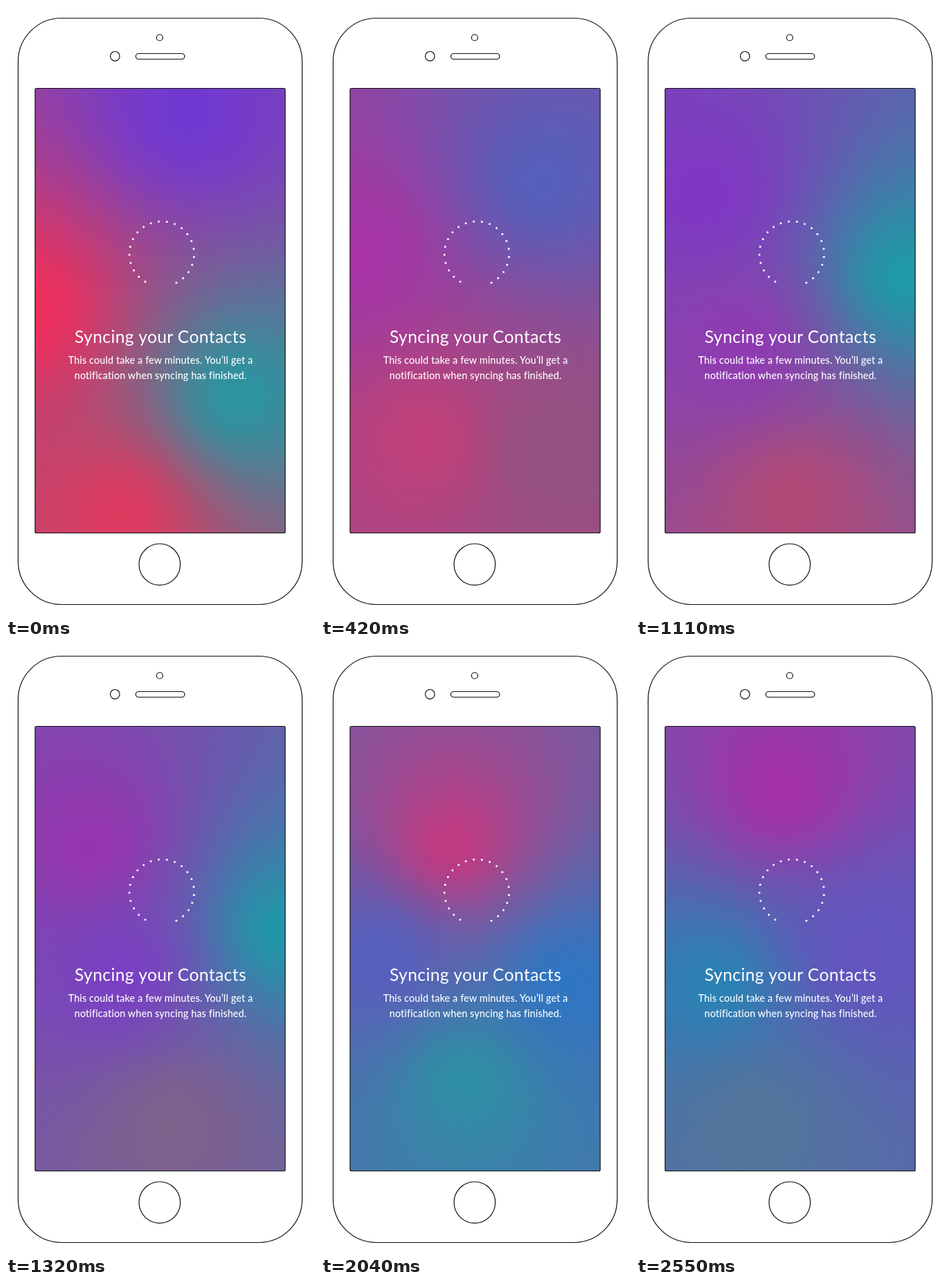
An HTML page with a canvas that plays this animation: 446x878 px, repeating every 2.58 s.

```html
<!DOCTYPE html>
<html lang="en">
<head>
<meta charset="utf-8">
<title>Syncing contacts</title>
<style>
  html, body { margin: 0; width: 100%; height: 100%; overflow: hidden; background: #fff; }
  canvas, svg { position: absolute; left: 0; top: 0; }
  canvas { left: 42px; top: 119px; width: 361px; height: 640px; }
  text { fill: #fff; text-anchor: middle; font-family: Lato, "Open Sans", sans-serif; }
  .title { font-size: 24.6px; letter-spacing: .4px; }
  .note { font-size: 14.3px; font-weight: 500; letter-spacing: .15px; }
</style>
</head>
<body>
<canvas width="91" height="160"></canvas>
<svg width="446" height="878" viewBox="0 0 446 878">
  <g fill="none" stroke="#111" stroke-width="1.2">
    <rect x="17.5" y="17.5" width="410" height="844" rx="62.5"/>
    <circle cx="221.8" cy="45.5" r="4.5"/>
    <circle cx="157.3" cy="72.3" r="6.8"/>
    <rect x="187.3" y="68.5" width="70.5" height="8" rx="4"/>
    <rect x="42" y="118.5" width="361" height="640" rx="2"/>
    <circle cx="221.8" cy="803.8" r="29.8"/>
  </g>
  <g id="dots" fill="#fff"></g>
  <text class="title" x="223" y="485">Syncing your Contacts</text>
  <text class="note" x="223" y="515">This could take a few minutes. You’ll get a</text>
  <text class="note" x="223" y="537">notification when syncing has finished.</text>
</svg>
<script>
const LOOP = 2580, STEP = 30;
const canvas = document.querySelector('canvas');
const ctx = canvas.getContext('2d');
const { width: W, height: H } = canvas;
const image = ctx.createImageData(W, H);

// Four wandering colour sources: "x y colour" at each key time.
const times = [0, 420, 840, 1320, 1590, 2040, 2550];
const sources = [
  '262 150 7139d2, 320 250 5660bb, 370 350 2496a6, 400 410 2296a8, 400 445 2296a8, 355 490 2f76c2, 330 440 6354c0',
  '30 435 ee2e5c, 48 360 a733a5, 72 258 7139d2, 120 290 9636ae, 148 315 b83a88, 188 287 c03a80, 210 205 a432a6',
  '335 560 2b95a0, 330 640 93527f, 225 715 dc3464, 240 690 7f628c, 265 655 4180a5, 209 626 2f8fa4, 170 690 54769a',
  '165 730 dd3a60, 150 620 c04079, 135 515 ad369a, 165 475 7a40c2, 165 445 7440cc, 85 450 5660be, 110 490 2b82b4'
].map(track => track.split(', ').map(key => {
  const [x, y, hex] = key.split(' ');
  const rgb = parseInt(hex, 16);
  return [(x - 42) / 4, (y - 119) / 4, rgb >> 16, rgb >> 8 & 255, rgb & 255];
}));

// Smooth curve through the keys of one source (cubic Hermite).
function sample(keys, t) {
  const last = times.length - 1;
  let i = 0;
  while (i < last - 1 && t >= times[i + 1]) i++;
  const span = times[i + 1] - times[i], u = Math.min(1, (t - times[i]) / span);
  const slope = (k, c) => {
    const a = Math.max(0, k - 1), b = Math.min(last, k + 1);
    return (keys[b][c] - keys[a][c]) / (times[b] - times[a]) * span;
  };
  return keys[i].map((p, c) => {
    const q = keys[i + 1][c], m = slope(i, c), n = slope(i + 1, c);
    return p + u * (m + u * (3 * (q - p) - 2 * m - n + u * (2 * (p - q) + m + n)));
  });
}

// Blend the sources by inverse squared distance.
function paint(t) {
  const points = sources.map(keys => sample(keys, t));
  for (let y = 0, o = 0; y < H; y++) {
    for (let x = 0; x < W; x++, o += 4) {
      let r = 0, g = 0, b = 0, sum = 0;
      for (const [px, py, pr, pg, pb] of points) {
        const w = 1 / ((x - px) ** 2 + (y - py) ** 2 + 1);
        r += w * pr; g += w * pg; b += w * pb; sum += w;
      }
      image.data[o] = r / sum;
      image.data[o + 1] = g / sum;
      image.data[o + 2] = b / sum;
      image.data[o + 3] = 255;
    }
  }
  ctx.putImageData(image, 0, 0);
}

let dots = '';
for (let k = 0; k < 22; k++) {
  const a = (-149.3 + k * 14.4) * Math.PI / 180;
  const x = 224.8 + 46.7 * Math.sin(a), y = 356.7 - 46.7 * Math.cos(a);
  dots += `<circle cx="${x.toFixed(2)}" cy="${y.toFixed(2)}" r="1.5"/>`;
}
document.getElementById('dots').innerHTML = dots;

function frame() {
  const t = performance.now() % LOOP;
  paint(t - t % STEP);
  requestAnimationFrame(frame);
}
frame();
</script>
</body>
</html>
```
